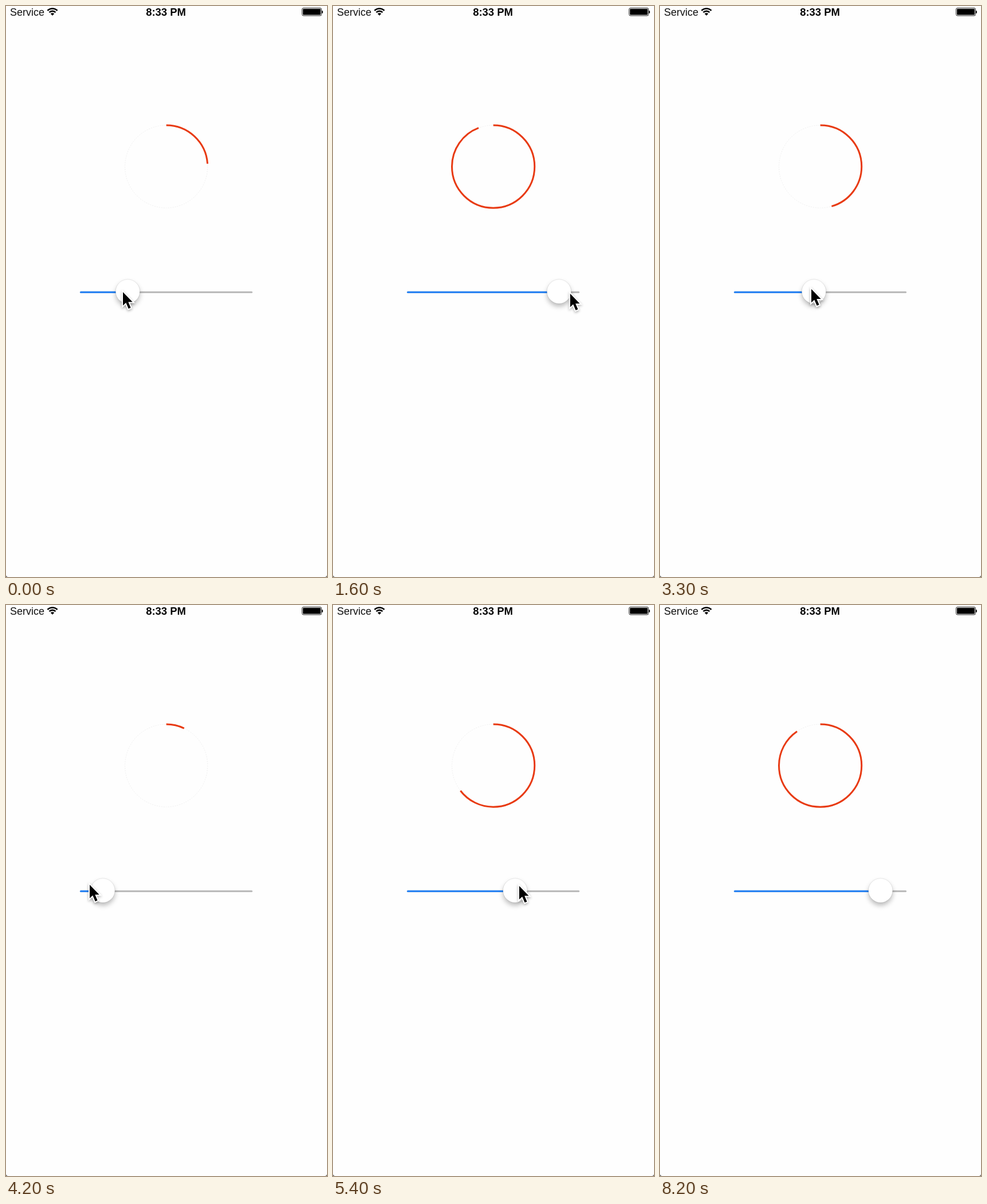
Animation of 560x996 px, one loop 8600 ms. Source, as an HTML page with a canvas:

```html
<!DOCTYPE html>
<html lang="en">
<head>
<meta charset="utf-8">
<title>Circular progress</title>
<style>
  html, body { margin: 0; width: 100%; height: 100%; overflow: hidden; background: #fefefe; }
  canvas { position: absolute; left: 0; top: 0; }
  span { position: absolute; top: 1px; font: 18px/20px "Liberation Sans", Arial, sans-serif; color: #111; white-space: nowrap; }
  #network { left: 7px; }
  #clock { left: 179px; width: 200px; text-align: center; font-weight: bold; font-size: 18.4px; color: #000; }
</style>
</head>
<body>
<canvas id="stage" width="560" height="996"></canvas>
<span id="network">Service</span>
<span id="clock">8:33 PM</span>
<script>
const ctx = document.getElementById('stage').getContext('2d');
const LOOP = 8600, STEP = 100, TAU = Math.PI * 2;
const RING = { x: 279.6, y: 280.1, r: 72.1 };
const TRACK = { left: 129, right: 430, y: 499.2, knobMin: 150.5, knobSpan: 258.8 };

// Three drags of the knob, then the pointer leaves the stage.
const REST = { progress: 0.239, x: 204, y: 499 };
const MOVES = [
  { start: 0, end: 1950, power: 1.5, to: { progress: 1, x: 431, y: 502 } },
  { start: 2300, end: 4200, power: 1.18, to: { progress: 0.071, x: 146, y: 488 } },
  { start: 4500, end: 6300, power: 1.73, to: { progress: 0.894, x: 402, y: 491 } },
  { start: 6600, end: 7300, power: 1.2, to: { progress: 0.905, x: 575, y: 505 } }
];

const mix = (a, b, u) => a + (b - a) * u;
const clamp = u => Math.min(1, Math.max(0, u));

function poseAt(time) {
  return MOVES.reduce((pose, { start, end, power, to }) => {
    const u = 1 - (1 - clamp((time - start) / (end - start))) ** power;
    return {
      progress: mix(pose.progress, to.progress, u),
      x: mix(pose.x, to.x, u),
      y: mix(pose.y, to.y, u)
    };
  }, REST);
}

function fillRound(x, y, w, h, r, color) {
  ctx.fillStyle = color;
  ctx.beginPath();
  ctx.roundRect(x, y, w, h, r);
  ctx.fill();
}

function strokeArc(x, y, r, from, to, width, color) {
  ctx.strokeStyle = color;
  ctx.lineWidth = width;
  ctx.beginPath();
  ctx.arc(x, y, r, from, to);
  ctx.stroke();
}

function setShadow(color, blur, y) {
  ctx.shadowColor = color;
  ctx.shadowBlur = blur;
  ctx.shadowOffsetY = y;
}

function drawStatusBar() {
  const from = -TAU * 3 / 8, to = -TAU / 8;
  for (const r of [12.1, 7.7]) strokeArc(81, 16.6, r, from, to, 2.6, '#000');
  ctx.fillStyle = '#000';
  ctx.beginPath();
  ctx.moveTo(81, 16.8);
  ctx.arc(81, 16.8, 4.6, from, to);
  ctx.fill();

  ctx.strokeStyle = '#222';
  ctx.lineWidth = 1;
  ctx.beginPath();
  ctx.roundRect(516.5, 3.5, 34, 13.5, 2.5);
  ctx.stroke();
  fillRound(518, 5, 31, 10.5, 1, '#000');
  fillRound(551, 8, 2, 5, [0, 2, 2, 0], '#222');
}

function drawRing(progress) {
  const { x, y, r } = RING, top = -TAU / 4;
  ctx.setLineDash([2, 2]);
  strokeArc(x, y, r, 0, TAU, 1, '#f0f0f0');
  ctx.setLineDash([]);
  strokeArc(x, y, r, top, top + TAU * progress, 3, '#e83a12');
}

function drawSlider(progress) {
  const { left, right, y, knobMin, knobSpan } = TRACK;
  const x = knobMin + knobSpan * progress;
  fillRound(left, y - 1.5, right - left, 3, 1.5, '#b7b7b7');
  fillRound(left, y - 1.5, x - left, 3, 1.5, '#2080f6');
  ctx.save();
  setShadow('rgba(0,0,0,.27)', 8, 5);
  fillRound(x - 21, 477, 42, 42, 21, '#fff');
  ctx.restore();
  strokeArc(x, 498, 21.2, 0, TAU, 0.8, 'rgba(0,0,0,.1)');
}

function drawPointer(x, y) {
  ctx.save();
  ctx.translate(x, y);
  ctx.strokeStyle = '#fff';
  ctx.lineWidth = 4;
  setShadow('rgba(0,0,0,.3)', 4, 2);
  const shape = new Path2D('M0 0V23.5L5.3 18.6L9.7 29L13.6 27.3L9.3 17.2H16.7Z');
  ctx.stroke(shape);
  ctx.shadowColor = 'transparent';
  ctx.fillStyle = '#000';
  ctx.fill(shape);
  ctx.restore();
}

function drawCorners() {
  ctx.fillStyle = '#555';
  for (const [x, side] of [[0, 1], [560, -1]]) {
    ctx.beginPath();
    ctx.moveTo(x, 993);
    ctx.quadraticCurveTo(x + side * 0.5, 995.5, x + side * 3, 996);
    ctx.lineTo(x, 996);
    ctx.fill();
  }
}

function draw(time) {
  const { progress, x, y } = poseAt(time);
  ctx.fillStyle = '#fefefe';
  ctx.fillRect(0, 0, 560, 996);
  drawStatusBar();
  drawRing(progress);
  drawSlider(progress);
  drawPointer(x, y);
  drawCorners();
}

const start = performance.now();
function tick() {
  const time = (performance.now() - start) % LOOP;
  draw(Math.floor(time / STEP) * STEP);
  requestAnimationFrame(tick);
}
tick();
</script>
</body>
</html>
```
